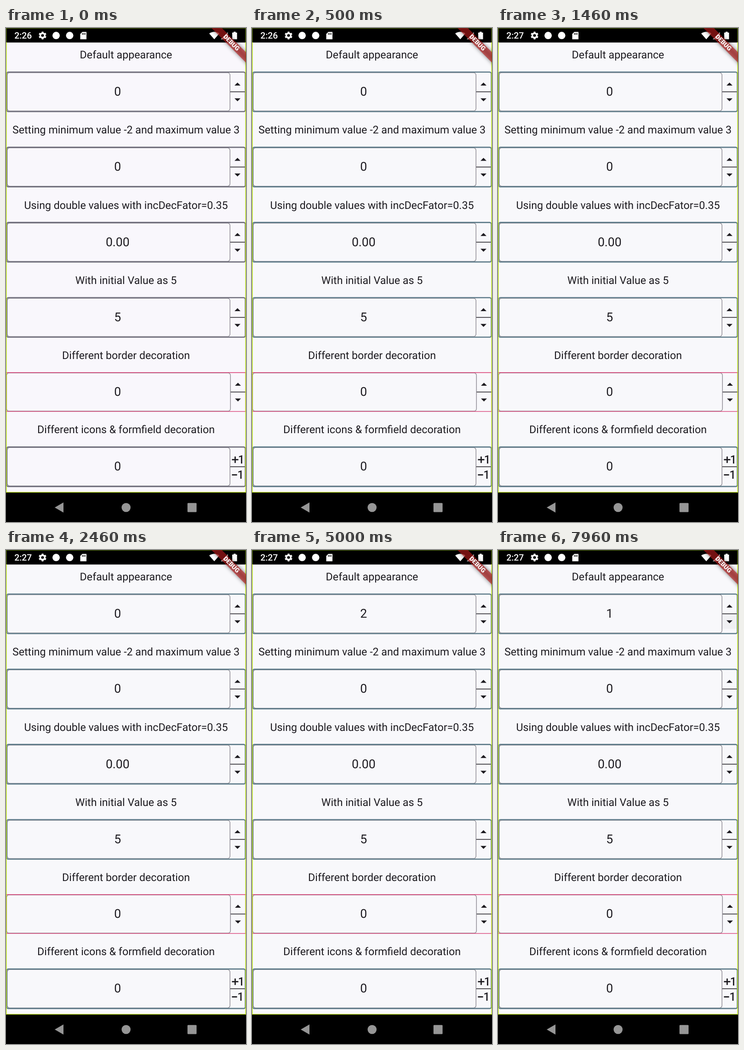
Recreate the animation shown at these times as an HTML page with a canvas. Size 522 px wide and 1073 px high, loop 8000 ms.

```html
<!DOCTYPE html>
<html lang="en">
<head>
<meta charset="utf-8">
<title>Number inputs</title>
<style>
  html, body { margin: 0; width: 100%; height: 100%; overflow: hidden; background: #000; }
  canvas { display: block; width: 522px; height: 1073px; }
</style>
</head>
<body>
<canvas id="stage" width="522" height="1073"></canvas>
<script>
const ctx = document.getElementById('stage').getContext('2d');
const W = 522, H = 1073, LOOP = 8000;
const DP = 1.329, FIELD_H = 83.1;
const FONT = 'Roboto, sans-serif';
const INK = '#1d1b20', LIME = '#b4da18', OLIVE = '#4c6410';

const rows = [
  { title: 'Default appearance', titleY: 57, top: 94.4 },
  { title: 'Setting minimum value -2 and maximum value 3', titleY: 220.5, top: 257.8, value: '0' },
  { title: 'Using double values with incDecFator=0.35', titleY: 384, top: 421.1, value: '0.00' },
  { title: 'With initial Value as 5', titleY: 547, top: 584.4, value: '5' },
  { title: 'Different border decoration', titleY: 710, top: 747.8, value: '0', thin: true },
  { title: 'Different icons & formfield decoration', titleY: 871, top: 908.8, value: '0', icons: true }
];

// Button presses on the first counter: start time and step
const taps = [[3730, 1], [4350, 1], [5680, 1], [6970, -1], [7700, -1]];

const plusOne = new Path2D('M10 7H8v4H4v2h4v4h2v-4h4v-2h-4V7zm10 11h-2V7.38L15 8.4V6.7L19.7 5h.3v13z');
const minusOne = new Path2D('M4 11v2h8v-2H4zm15 7h-2V7.38L14 8.4V6.7L18.7 5h.3v13z');

function rect(x, y, w, h, color) {
  ctx.fillStyle = color;
  ctx.fillRect(x, y, w, h);
}

function poly(color, ...pts) {
  ctx.fillStyle = color;
  ctx.beginPath();
  for (let i = 0; i < pts.length; i += 2) ctx.lineTo(pts[i], pts[i + 1]);
  ctx.closePath();
  ctx.fill();
}

function disc(x, y, r, color) {
  ctx.fillStyle = color;
  ctx.beginPath();
  ctx.arc(x, y, r, 0, Math.PI * 2);
  ctx.fill();
}

function outline(x, y, w, h, r, color, line) {
  ctx.strokeStyle = color;
  ctx.lineWidth = line;
  ctx.beginPath();
  ctx.roundRect(x, y, w, h, r);
  ctx.stroke();
}

function text(str, x, y, font, color, align = 'center') {
  ctx.font = font + ' ' + FONT;
  ctx.textRendering = 'geometricPrecision';
  ctx.fillStyle = color;
  ctx.textAlign = align;
  ctx.fillText(str, x, y);
}

function icon(path, x, y) {
  ctx.save();
  ctx.translate(x, y);
  ctx.scale(1.4, 1.4);
  ctx.fillStyle = INK;
  ctx.fill(path);
  ctx.restore();
}

function counter(t) {
  return taps.reduce((sum, [at, step]) => sum + (t >= at + 40 ? step : 0), 0);
}

function glow(age) {
  if (age < 0 || age > 450) return 0;
  return Math.min(age / 120, 1, (450 - age) / 300);
}

function drawRow(row, value, edge) {
  const { top, thin } = row;
  const border = thin ? DP : 2 * DP;
  const inset = thin ? 1 : 0;
  const mid = top + border + FIELD_H / 2;
  const x = 503.5 + inset;
  const left = border;
  const right = 487.2 + inset;

  text(row.title, 261, row.titleY + 8.5, '23.2px', INK);
  outline(left, top + border, right - left, FIELD_H, 5.3, '#85828a', DP);
  outline(border / 2, top + border / 2, W - border, FIELD_H + border,
    thin ? 0 : 4, thin ? '#d8336c' : edge, border);
  text(value, 242.8, mid + 8.2, '26.6px', INK);

  rect(right + 0.5, mid - 0.8, W - border - right - 0.5, 1.5, INK);
  if (row.icons) {
    icon(plusOne, 485.8, mid - 32.1);
    icon(minusOne, 485.8, mid + 0.9);
  } else {
    poly(INK, x - 6.5, mid - 13.6, x, mid - 20.1, x + 6.5, mid - 13.6);
    poly(INK, x - 6.5, mid + 14.1, x, mid + 20.6, x + 6.5, mid + 14.1);
  }
}

function drawGear(x, y) {
  ctx.save();
  ctx.translate(x, y);
  ctx.strokeStyle = '#fff';
  ctx.lineWidth = 3.6;
  ctx.beginPath();
  ctx.arc(0, 0, 4.8, 0, Math.PI * 2);
  ctx.stroke();
  for (let i = 0; i < 6; i++) {
    rect(-2, -8.4, 4, 3.4, '#fff');
    ctx.rotate(Math.PI / 3);
  }
  ctx.restore();
}

function drawStatus(t) {
  rect(0, 0, W, 31.5, '#000');
  text(t < 880 ? '2:26' : '2:27', 18.3, 23.2, '500 19.3px', '#fff', 'left');
  drawGear(79.5, 16.3);
  disc(109, 16.3, 8, '#fff');
  disc(138.5, 16.3, 8, '#fff');

  poly('#fff', 166, 8.5, 175, 8.5, 175, 24.5, 161.5, 24.5, 161.5, 13);
  for (let i = 0; i < 3; i++) rect(165.5 + i * 2.9, 11, 1.5, 3.6, '#000');

  ctx.fillStyle = '#fff';
  ctx.beginPath();
  ctx.moveTo(453, 24.5);
  ctx.lineTo(442, 12);
  ctx.quadraticCurveTo(453, 4.5, 464, 12);
  ctx.fill();
  poly('#fff', 467, 24.5, 482.5, 24.5, 482.5, 9);
  rect(492, 10, 10.5, 14.5, '#fff');
  rect(495, 8, 4.5, 2.5, '#fff');
}

function drawNav() {
  rect(0, 1009, W, 64, '#000');
  const gray = '#969696';
  poly(gray, 106, 1041.5, 125, 1030.5, 125, 1052.5);
  disc(261.2, 1041.5, 9.8, gray);
  ctx.fillStyle = gray;
  ctx.beginPath();
  ctx.roundRect(394.7, 1031.7, 19.8, 19.8, 1.5);
  ctx.fill();
}

function drawBanner() {
  const near = 28 * DP, depth = 12 * DP;
  ctx.save();
  ctx.translate(W, 0);
  ctx.rotate(Math.PI / 4);
  ctx.filter = 'blur(4.5px)';
  rect(-70, near, 140, depth, 'rgba(0,0,0,.5)');
  ctx.filter = 'none';
  rect(-70, near, 140, depth, 'rgba(183,28,28,.63)');
  text('DEBUG', 0, near + depth - 3.9, '900 13.6px', '#fff');
  ctx.restore();
}

function drawFrameLines() {
  for (const x of [0, W - 1.5]) {
    rect(x, 31, 1.5, 978, LIME);
    rect(x, 0, 1.5, 31, OLIVE);
  }
  rect(0, 1007.7, W, 1.4, LIME);
  rect(0, 0, W, 1.2, OLIVE);
}

function draw(t) {
  const opening = t < 40;
  rect(0, 0, W, H, opening ? '#f9f7fc' : '#f8f8fb');
  for (const [at, step] of taps) {
    const a = glow(t - at);
    if (a) rect(488, step > 0 ? 106 : 139, 31, 32, `rgba(0,0,0,${0.05 * a})`);
  }
  const edge = opening ? '#71707d' : '#607d8b';
  for (const row of rows) drawRow(row, row.value ?? String(counter(t)), edge);
  drawStatus(t);
  drawNav();
  drawFrameLines();
  drawBanner();
}

let start;
function tick(now) {
  start ??= now;
  draw((now - start) % LOOP);
  requestAnimationFrame(tick);
}
draw(0);
requestAnimationFrame(tick);
</script>
</body>
</html>
```
